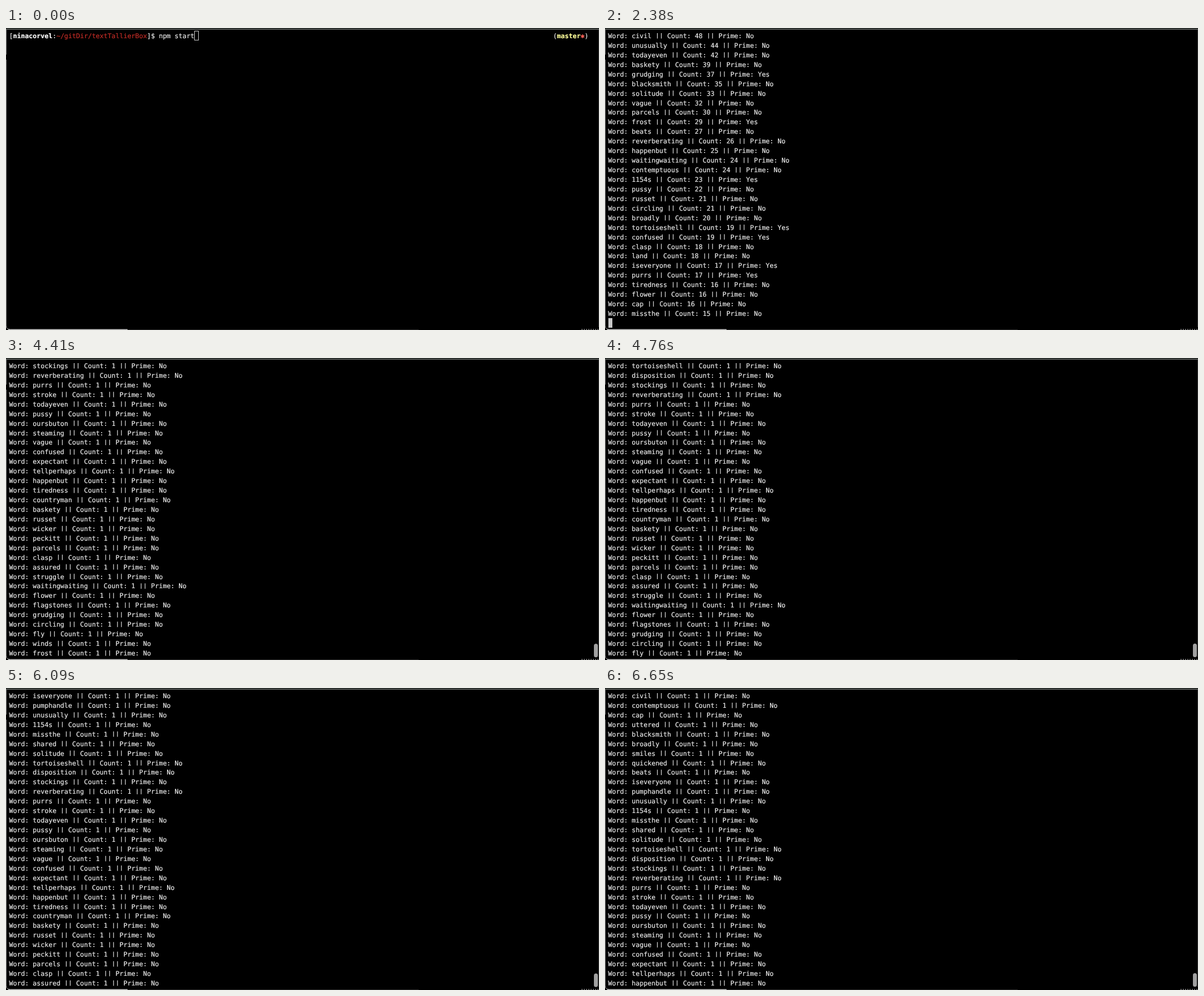
An HTML page with a canvas for the animation above (6.72 s loop, 1049 by 534 pixels).

```html
<!DOCTYPE html>
<html lang="en">
<head>
<meta charset="utf-8">
<title>Terminal word count</title>
<style>
  html, body { margin: 0; width: 100%; height: 100%; overflow: hidden; background: #000; }
  canvas { display: block; }
</style>
</head>
<body>
<canvas id="stage" width="1049" height="534"></canvas>
<script>
const ctx = document.getElementById('stage').getContext('2d');
const W = 1049, H = 534, LOOP = 6720, TICK = 70;
const FONT = '11.58px "DejaVu Sans Mono", "DejaVu Sans", monospace';
const ADVANCE = 6.972, LEFT = 5.5, ROW = 16.933, TOP = 5.2, BASELINE = 18;
const ROWS = 31, LAST = ROWS - 1, PROMPT_COLS = 38;
const INK = '#ececec', WHITE = '#fff', RED = '#c42d27', CURSOR = '#c9c9c9';

const USER = 'ninacorvel', APP = 'textTallierBox';

const words = (
  'civil contemptuous cap uttered blacksmith broadly smiles quickened beats ' +
  'iseveryone pumphandle unusually 1154s missthe shared solitude tortoiseshell ' +
  'disposition stockings reverberating purrs stroke todayeven pussy oursbuton ' +
  'steaming vague confused expectant tellperhaps happenbut tiredness countryman ' +
  'baskety russet wicker peckitt parcels clasp assured struggle waitingwaiting ' +
  'flower flagstones grudging circling fly winds frost land opens mossypagescom'
).split(' ').concat('');
const BOTTOM = words.length - LAST;

// Times at which the view moves one line further up; a repeat moves two.
const scrollTimes = [
  3780, 3920, 4060, 4200, 4410, 4550, 4690,
  4900, 5040, 5110, 5180, 5320, 5530, 6090,
  6160, 6230, 6300, 6370, 6370, 6440, 6510, 6580, 6650
];

const colX = col => LEFT + col * ADVANCE;
const rowY = row => TOP + row * ROW;

function text(str, col, row, color = INK, bold = false) {
  const x = colX(col), y = BASELINE + row * ROW;
  ctx.font = (bold ? 'bold ' : '') + FONT;
  ctx.fillStyle = ctx.strokeStyle = color;
  ctx.lineWidth = 0.2;
  ctx.fillText(str, x, y);
  ctx.strokeText(str, x, y);
}

function rect(color, x, y, w, h) {
  ctx.fillStyle = color;
  ctx.fillRect(x, y, w, h);
}

// The terminal's pipes are only as tall as its capitals.
function pipes(col, row) {
  for (const c of [col, col + 1]) {
    rect(INK, colX(c) + ADVANCE / 2 - 0.55, BASELINE + row * ROW - 9, 1.1, 9.6);
  }
}

function cursor(col, row, hollow = false) {
  const x = Math.round(colX(col) + 0.5), y = Math.round(rowY(row));
  if (hollow) {
    ctx.strokeStyle = CURSOR;
    ctx.lineWidth = 1;
    ctx.strokeRect(x - 0.5, y + 0.5, 7, 16);
  } else {
    rect(CURSOR, x, y, 7, 17);
  }
}

function runs(col, row, parts) {
  for (const [str, color, bold] of parts) {
    text(str, col, row, color, bold);
    col += str.length;
  }
}

function prompt(row, command = '') {
  runs(0, row, [
    ['['], [USER, WHITE, true], [':'],
    ['~/gitDir/' + APP, RED], [']$ ' + command]
  ]);
  runs(138, row, [['('], ['master', '#ffff9a', true], ['✱', '#ff6258', true], [')']]);
}

function isPrime(n) {
  for (let d = 2; d * d <= n; d++) if (n % d === 0) return false;
  return n > 1;
}

function wordLine(word, count, row) {
  const fields = [`Word: ${word}`, `Count: ${count}`, `Prime: ${isPrime(count) ? 'Yes' : 'No'}`];
  let col = 0;
  fields.forEach((field, i) => {
    if (i) pipes(col - 3, row);
    text(field, col, row);
    col += field.length + 4;
  });
}

function command(t) {
  prompt(0, 'npm start');
  if (t < 1260) return cursor(PROMPT_COLS + 9, 0, t < 280);
  if (t < 2100) return cursor(0, 1);
  text(`> ${APP.toLowerCase()}@1.0.0 start /Users/${USER}/gitDir/${APP}`, 0, 2);
  text('> node index.js', 0, 3);
  cursor(0, 5);
}

function flood(t) {
  const step = Math.floor((t - 2380) / TICK);
  for (let row = 0; row < LAST; row++) {
    const n = step * 173 + row;
    const count = Math.max(1, Math.floor(48 / (1 + n / 14)));
    wordLine(words[(n * 11 + step * 5) % (words.length - 2)], count, row);
  }
  cursor(0, LAST);
}

function results(t) {
  const offset = scrollTimes.filter(time => t >= time).length;
  for (let row = 0; row < ROWS; row++) {
    const index = BOTTOM - offset + row;
    if (index < words.length) wordLine(words[index], 1, row);
  }
  if (!offset) {
    prompt(LAST);
    cursor(PROMPT_COLS, LAST);
  } else {
    ctx.fillStyle = '#a0a0a0';
    ctx.beginPath();
    ctx.roundRect(1040, 505.4 - offset * 0.05, 7, 24, 3.5);
    ctx.fill();
  }
}

function windowEdges() {
  rect('#252827', 0, 0, W, 2);
  rect('#777977', 0, 2, W, 1);
  rect('#858585', 0, 3, 1, 526);
  rect('#111', 0, 47, 1, 9);
  rect('#383838', 1048, 3, 1, 526);
  rect('#292929', 215, 533, 515, 1);
  rect('#c4c4c4', 4, 532.5, 211, 1.5);
  ctx.strokeStyle = '#a5a5a5';
  ctx.lineWidth = 1;
  ctx.beginPath();
  ctx.moveTo(0.5, 527);
  ctx.quadraticCurveTo(0.5, 532.5, 6, 532.5);
  ctx.stroke();
  for (let x = 1018; x < 1047; x += 4) rect('#666', x, 532, 2, 2);
}

function draw(t) {
  rect('#000', 0, 0, W, H);
  windowEdges();
  if (t < 2380) command(t);
  else if (t < 2940) flood(t);
  else results(t);
}

ctx.textRendering = 'geometricPrecision';
const start = performance.now();
function frame() {
  draw((performance.now() - start) % LOOP);
  requestAnimationFrame(frame);
}
frame();
</script>
</body>
</html>
```
